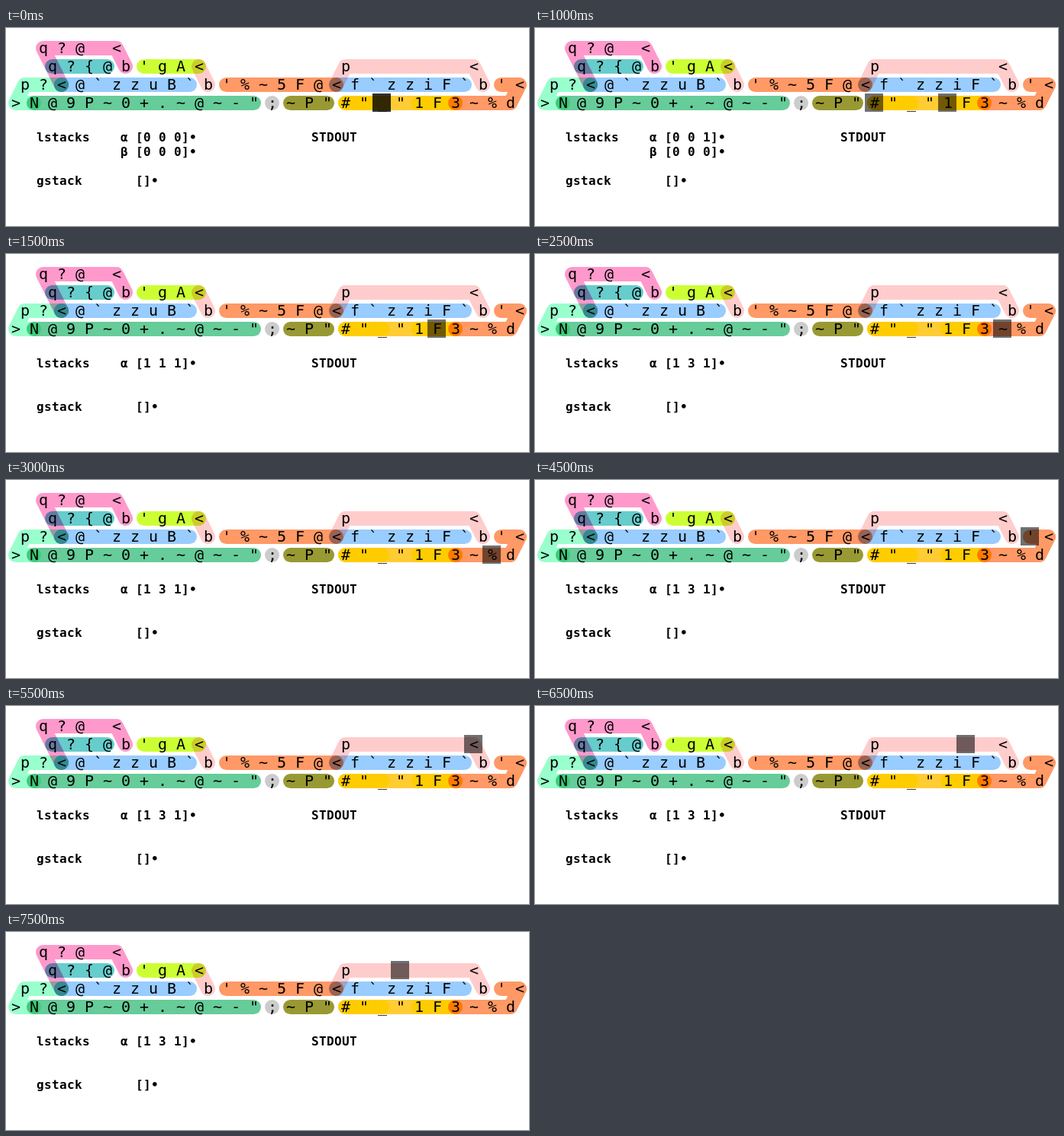
Recreate the animation shown at these times as an HTML page. Size 685 by 260 pixels, loop 8 s.

```html
<!DOCTYPE html>
<html lang="en">
<head>
<meta charset="utf-8">
<title>Code path trace</title>
<style>
  html, body { margin: 0; width: 100%; height: 100%; overflow: hidden; background: #fff; }
  svg { display: block; width: 685px; height: 260px; background: #fff; }
  text { font-family: "DejaVu Sans Mono", monospace; }
  .cell { font-size: 20px; }
  .label { font-size: 16px; font-weight: bold; }

  #runs path { fill: none; stroke-width: 19; stroke-linecap: round; stroke-linejoin: round; mix-blend-mode: multiply; }
  #runs .plain { mix-blend-mode: normal; }

  .cursor { fill: #000; fill-opacity: .56; }
  #main { animation: walk 8s infinite; }
  #fork { animation: fork 8s infinite; }
  .state { opacity: 0; animation: 8s step-end infinite; }
  #a0 { animation-name: a0; }
  #a1 { animation-name: a1; }
  #a2 { animation-name: a2; }
  #a3 { animation-name: a3; }
  #a4 { animation-name: a4; }
  #b0 { animation-name: b0; }

  @keyframes walk {
    0%     { transform: translate(480px, 86px); animation-timing-function: steps(7); }
    43.75% { transform: translate(648px, 86px); animation-timing-function: step-end; }
    50%    { transform: translate(660px, 62px); animation-timing-function: steps(2); }
    62.5%  { transform: translate(612px, 62px); animation-timing-function: step-end; }
    68.75% { transform: translate(600px, 38px); animation-timing-function: steps(5); }
    100%   { transform: translate(480px, 38px); }
  }
  @keyframes fork {
    0%     { transform: translate(480px, 86px); opacity: 1; animation-timing-function: steps(3); }
    18.74% { transform: translate(408px, 86px); opacity: 1; animation-timing-function: step-end; }
    18.75%, 100% { transform: translate(408px, 86px); opacity: 0; animation-timing-function: step-end; }
  }
  @keyframes a0 { 0% { opacity: 1; } 12.5%, 100% { opacity: 0; } }
  @keyframes a1 { 0% { opacity: 0; } 12.5% { opacity: 1; } 18.75%, 100% { opacity: 0; } }
  @keyframes a2 { 0% { opacity: 0; } 18.75% { opacity: 1; } 25%, 100% { opacity: 0; } }
  @keyframes a3 { 0% { opacity: 0; } 25% { opacity: 1; } 31.25%, 100% { opacity: 0; } }
  @keyframes a4 { 0% { opacity: 0; } 31.25%, 100% { opacity: 1; } }
  @keyframes b0 { 0% { opacity: 1; } 18.75%, 100% { opacity: 0; } }
</style>
</head>
<body>
<svg viewBox="0 0 685 260">
  <g id="runs" transform="translate(.5 .5)">
    <path class="plain" stroke="#ffcc33" d="M444 98H588"/>
    <path class="plain" stroke="#ffcc00" d="M444 98H492M540 98H588"/>
    <path stroke="#ff9966" d="M588 98H660L672 74H648"/>
    <path stroke="#ff9966" d="M288 74H432"/>
    <path stroke="#99ccff" d="M72 74H240"/>
    <path stroke="#99ccff" d="M432 74H600"/>
    <path stroke="#ffcccc" d="M624 74L612 50H444L432 74"/>
    <path stroke="#ffcccc" d="M264 74L252 50"/>
    <path stroke="#ccff33" d="M180 50H252"/>
    <path stroke="#ff99cc" d="M156 50L144 26H48L72 74"/>
    <path stroke="#66cccc" d="M60 50H132"/>
    <path stroke="#99ffcc" d="M36 98H12L24 74H72"/>
    <path stroke="#66cc99" d="M36 98H324"/>
    <path stroke="#cccccc" d="M348 98h.01"/>
    <path stroke="#999933" d="M372 98H420"/>
    <circle cx="72" cy="74" r="9.5" fill="#338a92"/>
  </g>
  <g id="glyphs"></g>
  <rect id="fork" class="cursor" width="24" height="24"/>
  <rect id="main" class="cursor" width="24" height="24"/>
</svg>
<script>
  const glyphs = document.getElementById("glyphs");

  // Sets every visible character on a fixed pitch.
  function place(str, x, y, pitch, cls, id) {
    const el = document.createElementNS("http://www.w3.org/2000/svg", "text");
    const xs = [];
    [...str].forEach((c, i) => { if (c !== " ") xs.push(x + i * pitch); });
    el.textContent = str.replace(/ /g, "");
    el.setAttribute("x", xs.join(" "));
    el.setAttribute("y", y);
    el.setAttribute("class", cls);
    if (id) el.id = id;
    glyphs.append(el);
  }

  // Alternate rows are shifted by half a cell.
  [
    " q?@ <",
    "  q?{@b'gA<       p      <",
    "p?<@`zzuB`b'%~5F@<f`zziF`b'<",
    ">N@9P~0+.~@~-\";~P\"#\"_\"1F3~%d"
  ].forEach((row, r) => place(row, r % 2 ? 7 : 19, 33 + 24 * r, 24, "cell"));

  const label = (str, x, y) => place(str, x, y, 10, "label");
  const state = (str, y, id) => place(str, 150, y, 10, "label state", id);

  label("lstacks", 40, 149);
  label("gstack", 40, 206);
  label("[]•", 170, 206);
  label("STDOUT", 400, 149);
  ["0 0 0", "0 0 1", "1 1 1", "1 1 3", "1 3 1"]
    .forEach((s, i) => state(`α [${s}]•`, 149, "a" + i));
  state("β [0 0 0]•", 168, "b0");
</script>
</body>
</html>
```
